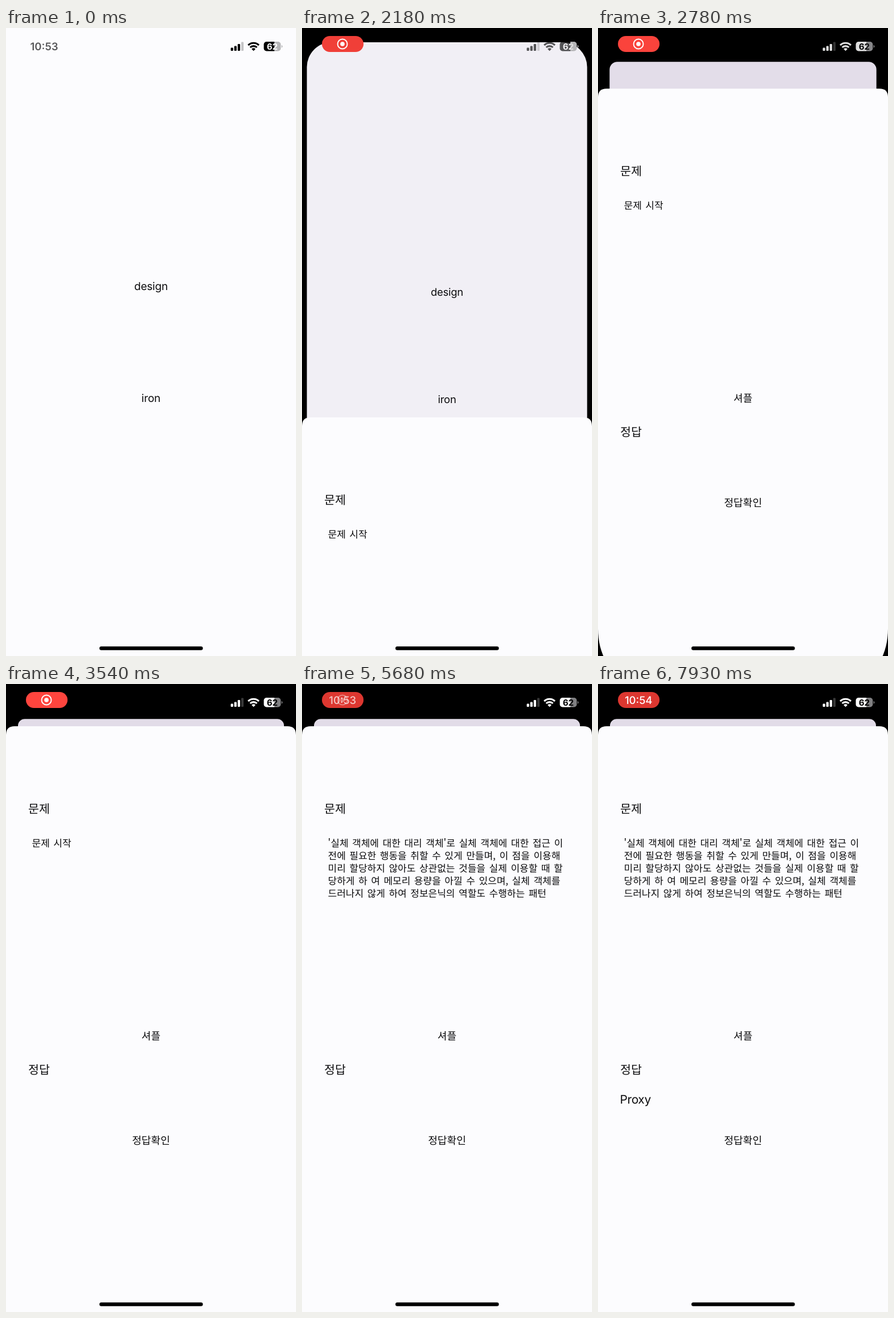
These frames come from a looping animation (509 by 1100 pixels, 8000 ms). An HTML page:

```html
<!DOCTYPE html>
<html lang="ko">
<head>
<meta charset="utf-8">
<style>
html, body { margin: 0; width: 100%; height: 100%; overflow: hidden; background: #000; }
svg { display: block; width: 509px; height: 1100px; }
text {
  font-family: "Noto Sans CJK KR", "Noto Sans CJK", sans-serif;
  fill: #0c0c0e; white-space: pre; text-rendering: geometricPrecision;
}
.latin { font-family: Inter, sans-serif; }
.word { font-size: 19px; letter-spacing: -.2px; }
.mid { text-anchor: middle; }
.head { font-size: 20.6px; }
.body { font-size: 17px; word-spacing: 1.8px; }
.btn { font-size: 18.1px; }
.clock { font-size: 18.5px; }
.pct { font: 700 15px Inter, sans-serif; }
</style>
</head>
<body>
<svg viewBox="0 0 509 1100">
  <defs>
    <g id="bars">
      <rect x="394.5" y="34.5" width="4.2" height="5.5" rx="1.2"/>
      <rect x="400.6" y="31.5" width="4.2" height="8.5" rx="1.2"/>
      <rect x="406.7" y="28" width="4.2" height="12" rx="1.2"/>
      <rect x="412.8" y="24.5" width="4.2" height="15.5" rx="1.2" opacity=".22"/>
    </g>
    <g id="wifi">
      <path d="M425.1 30.2a13.2 13.2 0 0 1 18.8 0M428.6 34a8.4 8.4 0 0 1 11.8 0" fill="none" stroke-width="3.1" stroke="currentColor"/>
      <path d="M434.5 40.2l-3.4-3.5a4.9 4.9 0 0 1 6.8 0z"/>
    </g>
    <clipPath id="cell"><rect x="452.5" y="24" width="29.8" height="16.5" rx="4.8"/></clipPath>
  </defs>

  <rect width="509" height="1100"/>
  <g id="page">
    <rect id="card" width="509" height="1100"/>
    <text class="latin word mid" x="254.5" y="459">design</text>
    <text class="latin word mid" x="254.5" y="654.5">iron</text>
  </g>

  <g id="sheet">
    <path id="panel" fill="#fcfcfe"/>
    <text class="head" x="39" y="151.5">문제</text>
    <g id="question"></g>
    <text class="btn mid" id="shuffle" x="254.5" y="548.5">셔플</text>
    <text class="head" x="39" y="608.5">정답</text>
    <text class="latin" id="answer" x="38.5" y="661" font-size="20.8" letter-spacing="-.3">Proxy</text>
    <text class="btn mid" id="check" x="254.5" y="731.5">정답확인</text>
  </g>

  <g id="rest">
    <rect x="471" y="24" width="12" height="17" clip-path="url(#cell)"/>
    <path d="M483.6 29.8q1.8 .8 1.8 2.5t-1.8 2.5z"/>
  </g>
  <g id="light"></g>
  <g id="dark"></g>

  <text class="latin clock" id="time" x="42.5" y="39" font-weight="600">10:53</text>
  <g id="pill">
    <rect id="pillBg" x="35" y="14" width="73" height="28" rx="14"/>
    <g id="rec">
      <circle cx="71" cy="28" r="8.5" fill="none" stroke="#fff" stroke-width="1.9"/>
      <circle cx="71" cy="28" r="3.8" fill="#fff"/>
    </g>
    <text class="latin clock mid" id="pillTime" x="71.2" y="34.7" font-weight="500" style="fill:#fff"></text>
  </g>
  <rect x="164" y="1083.3" width="181.5" height="6.4" rx="3.2"/>
</svg>
<script>
const LOOP = 8000, OPEN = 1966, SETTLED = 3410;
const $ = id => document.getElementById(id);
const clamp = v => Math.min(1, Math.max(0, v));
const ramp = (t, a, b) => clamp((t - a) / (b - a));
const ease = v => v * v * (3 - 2 * v);
const mix = (a, b, k) => a + (b - a) * k;
const rgb = (a, b, k) => `rgb(${a.map((v, i) => Math.round(mix(v, b[i], k)))})`;

const PAGE = [252, 252, 254], DIMMED = [226, 220, 232];
const RED = [221, 55, 48], BRIGHT = [255, 69, 62];
const REST = [182, 182, 184], REST_DARK = [128, 128, 130];
// Pill brightness: time, level
const GLOW = [[0, 0], [1300, 0], [2360, .6], [2780, .85], [3600, 1], [4510, 0],
              [5250, .7], [5680, 0], [6190, 0], [7035, .8], [7840, 0], [8000, 0]];

const START = ["문제 시작"];
const QUESTION = [
  "'실체 객체에 대한 대리 객체'로 실체 객체에 대한 접근 이",
  "전에 필요한 행동을 취할 수 있게 만들며, 이 점을 이용해",
  "미리 할당하지 않아도 상관없는 것들을 실제 이용할 때 할",
  "당하게 하 여 메모리 용량을 아낄 수 있으며, 실체 객체를",
  "드러나지 않게 하여 정보은닉의 역할도 수행하는 패턴"
];

function status(id, ink, label) {
  $(id).innerHTML = `<g fill="${ink}" color="${ink}"><use href="#bars"/><use href="#wifi"/>
    <rect x="452" y="24" width="19" height="17" clip-path="url(#cell)"/></g>
    <text class="pct mid" x="467.3" y="37.8" style="fill:${label}">62</text>`;
}
status("light", "#000", "#fff");
status("dark", "#fff", "#000");

let shown;
function ask(lines) {
  if (shown === lines) return;
  shown = lines;
  $("question").innerHTML = lines.map((s, i) =>
    `<text class="body" x="45.5" y="${211 + i * 21.9}">${s}</text>`).join("");
}

// Critically damped spring: share of the way still to go
function remaining(t) {
  if (t < OPEN) return 1;
  if (t >= SETTLED) return 0;
  const x = (t - OPEN) * .0065;
  return (1 + x) * Math.exp(-x);
}

function glow(t) {
  const i = GLOW.findIndex(g => g[0] > t);
  const [a, b] = [GLOW[i - 1], GLOW[i]];
  return mix(a[1], b[1], ease(ramp(t, a[0], b[0])));
}

const press = (t, down, up) => 1 - .75 * (ramp(t, down, down + 60) - ease(ramp(t, up, up + 300)));
const fade = (id, v) => $(id).setAttribute("opacity", v);
const paint = (id, color) => $(id).setAttribute("fill", color);

function draw(t) {
  const left = remaining(t), p = 1 - left;
  $("page").setAttribute("transform", `translate(${21 * p} ${61.3 * p}) scale(${1 - 42 / 509 * p})`);
  $("card").setAttribute("rx", p ? 13 + 54 * left : 0);
  paint("card", rgb(PAGE, DIMMED, p));

  $("sheet").setAttribute("transform", `translate(0 ${74 + 1026 * left})`);
  const [rx, ry] = left ? [48, 80] : [0, 0];
  $("panel").setAttribute("d", `M0 15Q0 0 15 0H494Q509 0 509 15V${1026 - ry}` +
    `A${rx} ${ry} 0 0 1 ${509 - rx} 1026H${rx}A${rx} ${ry} 0 0 1 0 ${1026 - ry}Z`);

  const night = ramp(t, 2170, 2870);
  fade("light", 1 - ramp(t, 2120, 2300));
  fade("dark", night);
  paint("rest", rgb(REST, REST_DARK, night));

  ask(t < 3900 ? START : QUESTION);
  fade("shuffle", press(t, 3760, 3920));
  fade("check", press(t, 7090, 7240));
  fade("answer", t < 7240 ? 0 : 1);

  fade("time", .68 * (1 - ramp(t, 20, 260)));
  fade("pill", ease(ramp(t, 60, 520)));
  paint("pillBg", rgb(RED, BRIGHT, glow(t)));
  fade("rec", 1 - ramp(t, 5480, 5800));
  fade("pillTime", ramp(t, 5480, 5760));
  $("pillTime").textContent = t < 6500 ? "10:53" : "10:54";
}

const begin = performance.now();
function tick() {
  draw((performance.now() - begin) % LOOP);
  requestAnimationFrame(tick);
}
tick();
</script>
</body>
</html>
```
